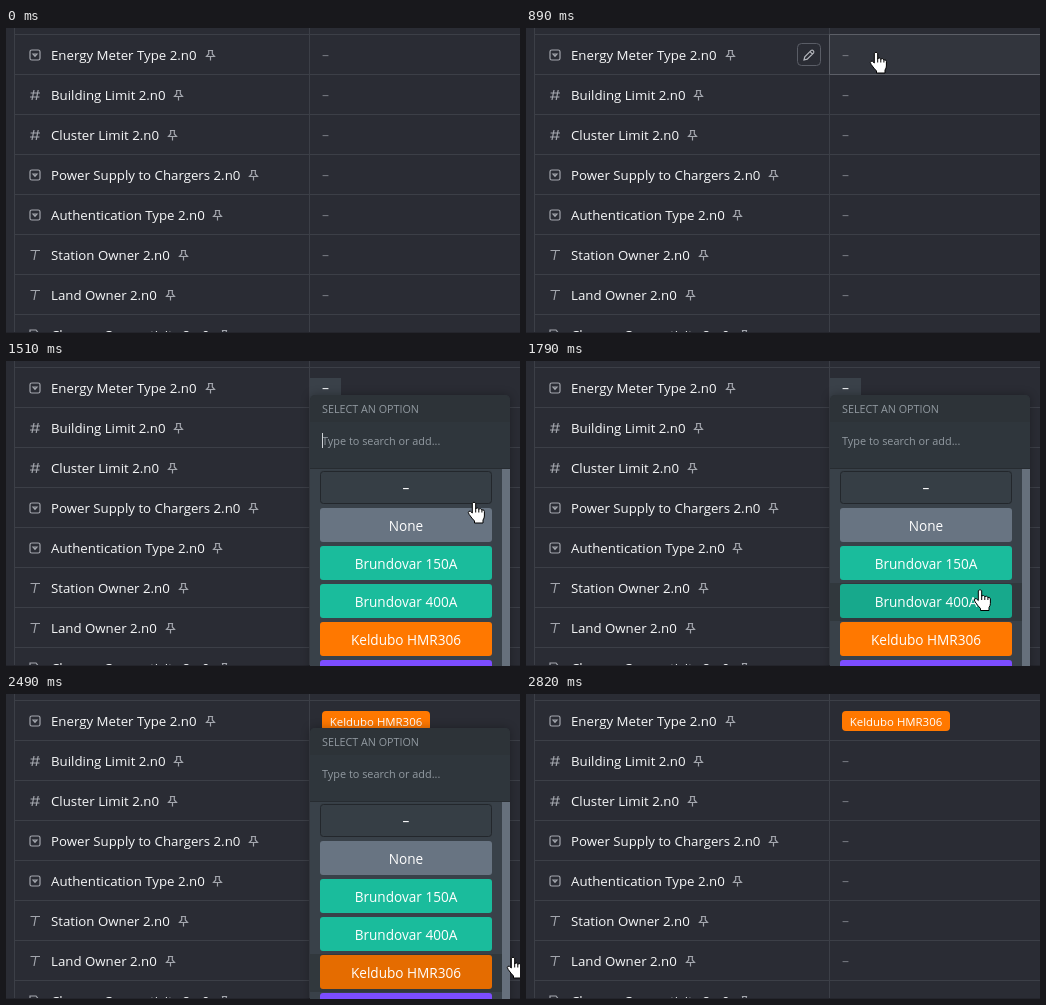
An HTML page with a canvas that plays this animation: 514 px wide and 305 px high, repeating every 4010 ms.

```html
<!DOCTYPE html>
<html lang="en">
<head>
<meta charset="utf-8">
<title>Select an option</title>
<style>
html, body { margin: 0; width: 100%; height: 100%; overflow: hidden; background: #2a2c34; }
canvas { display: block; }
</style>
</head>
<body>
<canvas id="stage" width="514" height="305"></canvas>
<script>
const W = 514, H = 305, LOOP = 4010;
const FONT = '"Open Sans", "Noto Sans", sans-serif';
const stage = document.getElementById('stage').getContext('2d');
const sheet = document.createElement('canvas');
sheet.width = W;
sheet.height = 380;
const layer = sheet.getContext('2d');

const BG = '#2a2c34', LINE = '#3c3f47', ICON = '#a3a6ad', ORANGE = '#ff7800';
const METER = 'Keldubo HMR306';

// icon, label, pin position
const rows = [
  ['select', 'Energy Meter Type 2.n0', 204],
  ['hash', 'Building Limit 2.n0', 172],
  ['hash', 'Cluster Limit 2.n0', 166],
  ['select', 'Power Supply to Chargers 2.n0', 247],
  ['select', 'Authentication Type 2.n0', 211],
  ['text', 'Station Owner 2.n0', 177],
  ['text', 'Land Owner 2.n0', 164],
  ['tag', 'Charger Connectivity 2.n0', 218]
];
const options = [
  ['–', '#363e45'],
  ['None', '#687482'],
  ['Brundovar 150A', '#1abc9c'],
  ['Brundovar 400A', '#1abc9c'],
  [METER, ORANGE],
  ['', '#7c4dff']
];

const icons = {
  select: new Path2D('M-3.2-5H3.2Q5-5 5-3.2V3.2Q5 5 3.2 5H-3.2Q-5 5-5 3.2V-3.2Q-5-5-3.2-5ZM-2-1H2L0 1.4Z'),
  hash: new Path2D('M-1-5L-3 5M3.2-5L1.2 5M-4.4-2H5M-5 2H4.4'),
  text: new Path2D('M-4.5-4.5H5M.8-4.5L-1 5'),
  tag: new Path2D('M-5-5H1L5 0L1 5H-5Z')
};
const pin = new Path2D('M-2.6-4.5H2.6M-1.8-4.5V-1L-4 1.5H4L1.8-1V-4.5M0 1.5V5.5');
const pencil = new Path2D('M-5 5L-4.2 1.8L2.2-4.6Q3.2-5.4 4.2-4.4Q5.3-3.2 4.6-2.2L-1.8 4.2ZM1-3.4L3.4-1');
const arrow = new Path2D('M0 0V16L3.7 12.6L6 18L8.6 17L6.3 11.6H11.3Z');
const hand = new Path2D('M-1.7 1.2Q0-1 1.7 1.2V6.5Q3.5 5.2 4.8 7Q6.8 6 7.9 7.9Q10 7.2 10.4 9.5V14Q10.4 16 9 18V21H.5V19Q-2 16.5-4.8 12.5Q-6.5 10-5 9.2Q-3.6 8.6-1.7 11Z');
const knuckles = new Path2D('M1.7 6V10.5M4.8 7V10.5M7.9 8V10.5');

// time, x, y of the pointer tip
const path = [
  [330, 175, 276], [540, 250, 160], [750, 335, 50], [820, 345, 30],
  [890, 350, 24], [1020, 352, 24], [1230, 375, 20], [1370, 388, 23],
  [1510, 468, 141], [1650, 466, 190], [1930, 442, 267], [2010, 440, 270],
  [2220, 442, 270], [2360, 478, 267], [2490, 507, 263]
];
// time, opacity of the popup
const fade = [[1090, 0], [1160, .25], [1230, .7], [1300, .94], [1370, 1], [2490, 1], [2560, .85], [2690, .35], [2820, 0]];

function sample(keys, t) {
  if (t <= keys[0][0]) return keys[0].slice(1);
  for (let i = 1; i < keys.length; i++) {
    const a = keys[i - 1], b = keys[i];
    if (t <= b[0]) {
      const k = (t - a[0]) / (b[0] - a[0]);
      return a.slice(1).map((v, j) => v + (b[j + 1] - v) * k);
    }
  }
  return keys[keys.length - 1].slice(1);
}

function tick(t) {
  const run = (start, last) => Math.min(last, start + Math.floor((t - start) / 70) * 70);
  if (t < 330) return 0;
  if (t < 1020) return run(330, 890);
  if (t < 2010) return run(1020, 1930);
  if (t < 2490) return run(2010, 2360);
  if (t < 2560) return 2490;
  return t < 2690 ? 2560 : t < 2820 ? 2690 : 2820;
}

function fill(c, color, x, y, w, h, r = 0) {
  c.fillStyle = color;
  c.beginPath();
  c.roundRect(x, y, w, h, r);
  c.fill();
}

function outline(c, color, x, y, w, h, r = 0) {
  c.strokeStyle = color;
  c.lineWidth = 1;
  c.beginPath();
  c.roundRect(x + .5, y + .5, w - 1, h - 1, r);
  c.stroke();
}

function label(c, str, x, y, size, color, align = 'left') {
  c.font = `${size}px ${FONT}`;
  c.textAlign = align;
  c.fillStyle = color;
  c.fillText(str, x, y);
}

function glyph(c, shape, x, y, color = ICON) {
  c.save();
  c.translate(x, y);
  c.strokeStyle = color;
  c.lineWidth = 1.2;
  c.stroke(shape);
  c.restore();
}

function drawHover(row) {
  const y = 27 + row * 40;
  fill(stage, '#32353d', 304, y - 20, W, 39);
  outline(stage, '#5c5f67', 303, y - 21, W, 41);
  outline(stage, '#5a5d66', 271, y - 12, 24, 23, 4);
  glyph(stage, pencil, 283, y, '#b4b6bc');
}

function drawTable(s) {
  const c = stage;
  fill(c, BG, 0, 0, W, H);
  fill(c, LINE, 8, 0, 1, H);
  fill(c, LINE, 303, 0, 1, H);
  rows.forEach((_, i) => fill(c, LINE, 8, 6 + i * 40, W, 1));
  if (s.row >= 0) drawHover(s.row);
  rows.forEach(([icon, name, pinX], i) => {
    const y = 27 + i * 40;
    glyph(c, icons[icon], 29, y);
    label(c, name, 45, y + 5, 13.25, '#f6f7f8');
    glyph(c, pin, pinX + .5, y);
    if (i === 0 && s.chosen) {
      fill(c, ORANGE, 316, 17, 108, 20, 4);
      label(c, METER, 370, 31.5, 11.4, '#fff', 'center');
    } else {
      const editing = i === 0 && s.editing;
      if (editing) fill(c, '#3a4149', 304, 17, 31, 20);
      label(c, '–', 316, y + 5, 14, editing ? '#f0f2f4' : '#73767e');
    }
  });
  fill(c, '#24252c', 0, 304, W, 1);
}

function drawPopup(s) {
  const c = layer;
  c.clearRect(0, 0, W, 380);
  c.save();
  c.shadowColor = 'rgba(0,0,0,.3)';
  c.shadowBlur = 10;
  fill(c, '#2f363c', 304, 34, 200, 312, 5);
  c.restore();
  c.save();
  c.beginPath();
  c.roundRect(304, 34, 200, 312, 5);
  c.clip();
  fill(c, '#2d3338', 304, 34, 200, 27);
  label(c, 'SELECT AN OPTION', 316, 52, 10.75, '#929aa1');
  label(c, 'Type to search or add...', 316, 84, 10.9, '#929aa1');
  if (s.caret) fill(c, '#d0d4d8', 316, 72, 1, 15);
  fill(c, '#394149', 304, 108, 200, 238);
  fill(c, '#272c31', 304, 107, 200, 1);
  fill(c, '#66707c', 496, 108, 8, 238);
  options.forEach(([name, color], i) => {
    const y = 109 + i * 38;
    const over = i > 0 && i === s.option;
    if (over) fill(c, '#31383d', 304, y - 1, 192, 38);
    fill(c, color, 314, y, 172, 34, 3);
    if (over) fill(c, 'rgba(0,0,0,.1)', 314, y, 172, 34, 3);
    if (i === 0) outline(c, '#23272c', 314, y + 1, 172, 33, 3);
    label(c, name, 400, y + 23, 13.6, '#fff', 'center');
  });
  c.restore();

  const k = .86 + .14 * s.open;
  stage.save();
  stage.globalAlpha = s.open;
  stage.translate(404, 190);
  stage.scale(k, k);
  stage.drawImage(sheet, -404, -190);
  stage.restore();
}

function drawPointer(s) {
  const c = stage;
  c.save();
  c.translate(s.x, s.y);
  c.fillStyle = '#fff';
  c.strokeStyle = '#000';
  c.lineWidth = 1;
  c.lineJoin = 'round';
  const shape = s.pointing ? hand : arrow;
  c.fill(shape);
  c.stroke(shape);
  if (s.pointing) c.stroke(knuckles);
  c.restore();
}

function stateAt(t) {
  const [x, y] = sample(path, t);
  const [open] = sample(fade, t);
  const visible = t >= 330 && t < 2560;
  const editing = t >= 1090 && t < 2150;
  const inList = t >= 1440 && y > 108;
  return {
    x, y, open, visible, editing,
    chosen: t >= 2150,
    row: visible && t < 1090 ? Math.floor((y - 7) / 40) : -1,
    option: inList ? Math.min(4, Math.floor((y - 108) / 38)) : -1,
    pointing: t < 1090 || inList,
    caret: t >= 1160 && t < 1720
  };
}

function frame(now) {
  const s = stateAt(tick(now % LOOP));
  drawTable(s);
  if (s.open > 0) drawPopup(s);
  if (s.visible) drawPointer(s);
  requestAnimationFrame(frame);
}
frame(0);
</script>
</body>
</html>
```
